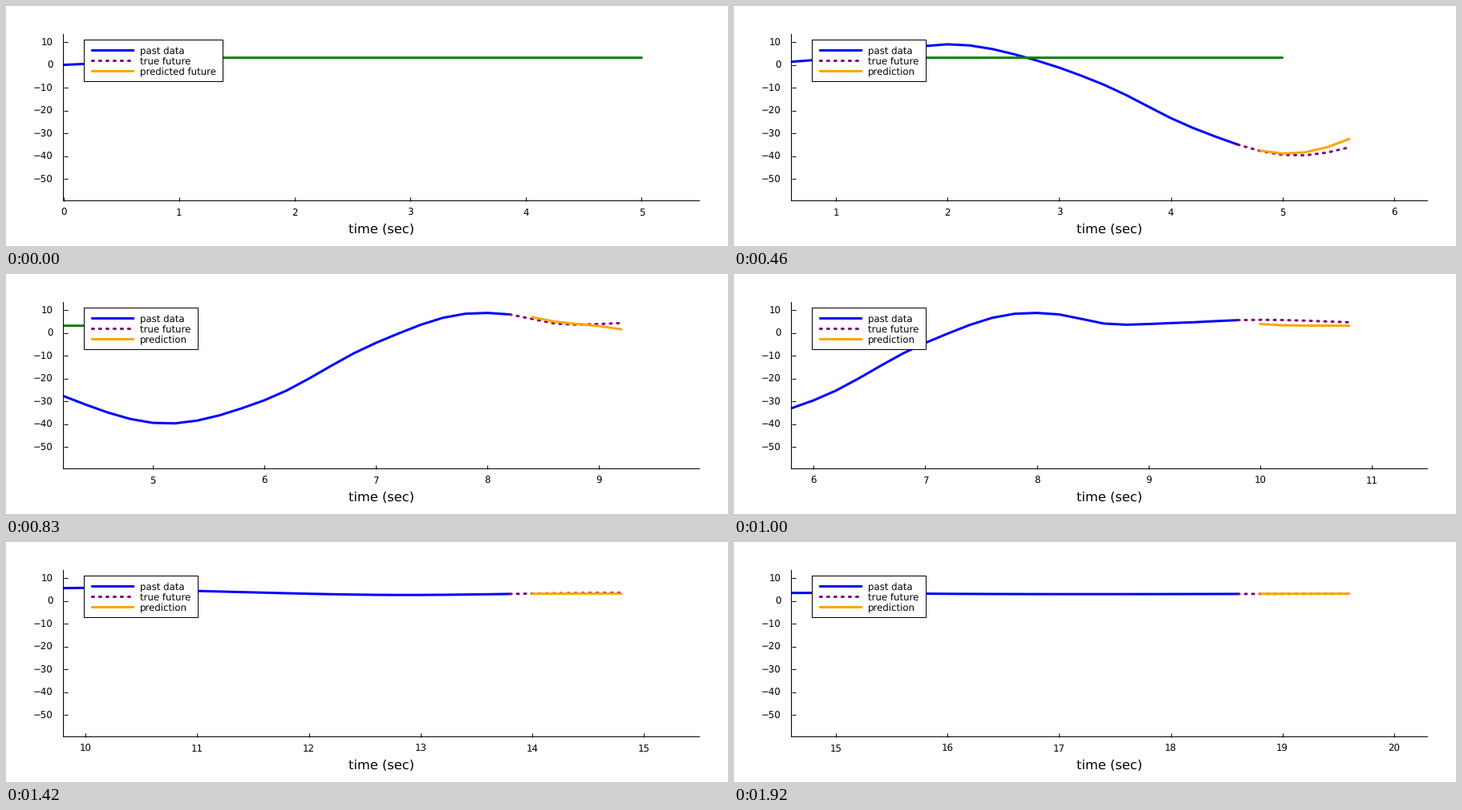
Recreate the animation shown at these times as a matplotlib script. Size 900 by 300 pixels, loop 1960 ms.

```python
import matplotlib.pyplot as plt
import numpy as np
from matplotlib.animation import FuncAnimation
from matplotlib.patches import Rectangle

W, H, DPI = 900, 300, 100
PX = 72 / DPI                     # points per pixel
LEFT, RIGHT, TOP, BOTTOM = 71.5, 864.5, 35.5, 243.5
ZERO_Y, UNIT_Y = 73.6, 2.848      # pixel row of zero, pixels per unit
DT, AHEAD, GOAL = 0.2, 5, np.pi

plt.rcParams.update({"font.family": "DejaVu Sans", "text.hinting": "none"})

# turning points of the controlled signal: (seconds, value)
KEYS = [(0, 0), (.8, 2.1), (1.4, 5.6), (2.1, 8.95), (2.8, 1.9), (3.4, -8.7),
        (4.2, -27.7), (5.1, -39.8), (6, -29.6), (7, -4.4), (7.8, 8.4),
        (8.2, 8.1), (8.6, 4.1), (9.2, 4.3), (9.9, 5.7), (11, 4.35),
        (12.6, 2.65), (14.8, 3.5), (16, 3.1), (20, GOAL)]


def smooth(keys, t):
    """Cubic Hermite curve through the key points."""
    kt, ky = np.array(keys, float).T
    slope = np.gradient(ky, kt)
    k = np.clip(np.searchsorted(kt, t, side="right") - 1, 0, len(kt) - 2)
    h = kt[k + 1] - kt[k]
    u = (t - kt[k]) / h
    blend = u * u * (3 - 2 * u)
    bend = slope[k] * u * (1 - u) ** 2 - slope[k + 1] * u * u * (1 - u)
    return ky[k] + (ky[k + 1] - ky[k]) * blend + h * bend


time = np.arange(99) * DT
signal = smooth(KEYS, time)


def forecast(i):
    """Predicted samples after sample i: unstable early, settling on GOAL."""
    t, j = time[i], np.arange(1, AHEAD + 1)
    truth = signal[i + 1:i + 1 + AHEAD]
    wild = np.interp(t, [.6, 1.4, 3, 4.2], [0, .25, -1, 0]) * (1.32 * 3.6 ** (j - 1) - .4)
    drift = np.interp(t, [3, 4.2, 6.2, 8.2], [0, .14, .17, 0]) * j ** 2
    swing = np.interp(t, [6.2, 8.2, 9.8], [0, 1, 0]) * (1.1 * j - .33 * j ** 2)
    rest = GOAL + (signal[i] - GOAL) * .3 ** j
    settle = np.interp(t, [8.2, 9.8], [0, 1]) * (rest - truth)
    return truth + wild + drift + swing + settle


fig = plt.figure(figsize=(W / DPI, H / DPI), dpi=DPI, facecolor="white")
ax = fig.add_axes([LEFT / W, 1 - BOTTOM / H, (RIGHT - LEFT) / W, (BOTTOM - TOP) / H])
ax.set_ylim((ZERO_Y - BOTTOM) / UNIT_Y, (ZERO_Y - TOP) / UNIT_Y)
ax.set_yticks(range(-50, 11, 10), labels=[])
ax.tick_params(direction="in", length=5 * PX, width=PX, labelsize=11.8 * PX)
ax.tick_params(axis="x", pad=18 * PX)
ax.spines[["top", "right"]].set_visible(False)
for side in ("left", "bottom"):
    ax.spines[side].set(linewidth=PX, snap=False)

# overlay in pixel coordinates for text and legend
hud = fig.add_axes([0, 0, 1, 1], zorder=5)
hud.set(xlim=(0, W), ylim=(H, 0))
hud.axis("off")


def write(x, y, text, size=11.8, ha="left"):
    return hud.text(x, y, text, fontsize=size * PX, ha=ha, va="baseline")


def stroke(axes, color, x=(), y=(), dashed=False):
    style = (0, (2.2 / 3, 6.8 / 3)) if dashed else "-"
    return axes.plot(x, y, color=color, lw=3 * PX, ls=style, snap=False,
                     solid_capstyle="round", dash_capstyle="round",
                     solid_joinstyle="round")[0]


for v in range(-50, 11, 10):
    write(59, ZERO_Y - v * UNIT_Y + 4.4, str(v).replace("-", "\u2212"), ha="right")
write(468.3, 284, "time (sec)", 16.2, "center")

past = stroke(ax, "blue")
future = stroke(ax, "purple", dashed=True)
guess = stroke(ax, "orange")
stroke(ax, "green", [1, 5], [GOAL, GOAL])

box = hud.add_patch(Rectangle((97.5, 42.5), 173, 52, fc="white", ec="black",
                              lw=PX, snap=False))
rows = [("blue", "past data"), ("purple", "true future"), ("orange", "")]
labels = []
for n, (color, name) in enumerate(rows):
    y = 55.5 + 13 * n
    stroke(hud, color, [107.3, 159], [y, y], color == "purple")
    labels.append(write(167.4, y + 4.3, name))


def update(tick):
    # 24 steps per second, shown on a 10 ms clock
    step = ((2 * tick + 1) * 6 - 1) // 50
    i = 1 + 2 * step
    now = time[i]
    past.set_data(time[:i + 1], signal[:i + 1])
    future.set_data(time[i:i + 1 + AHEAD], signal[i:i + 1 + AHEAD])
    guess.set_data(time[i + 1:i + 1 + AHEAD], forecast(i))

    scrolling = now > 4
    lo, hi = (now - 4, now + 1.7) if scrolling else (0, 5.5)
    marks = range(int(np.ceil(lo - 1e-6)), int(hi) + 1)
    ax.set_xticks(marks, labels=[str(m) for m in marks])
    for label in ax.get_xticklabels():
        label.set_va("baseline")
    ax.set_xlim(lo, hi)

    box.set_width(142 if scrolling else 173)
    labels[2].set_text("prediction" if scrolling else "predicted future")


anim = FuncAnimation(fig, update, frames=196, interval=10, repeat=True,
                     repeat_delay=0, init_func=lambda: update(0))
plt.show()
```
